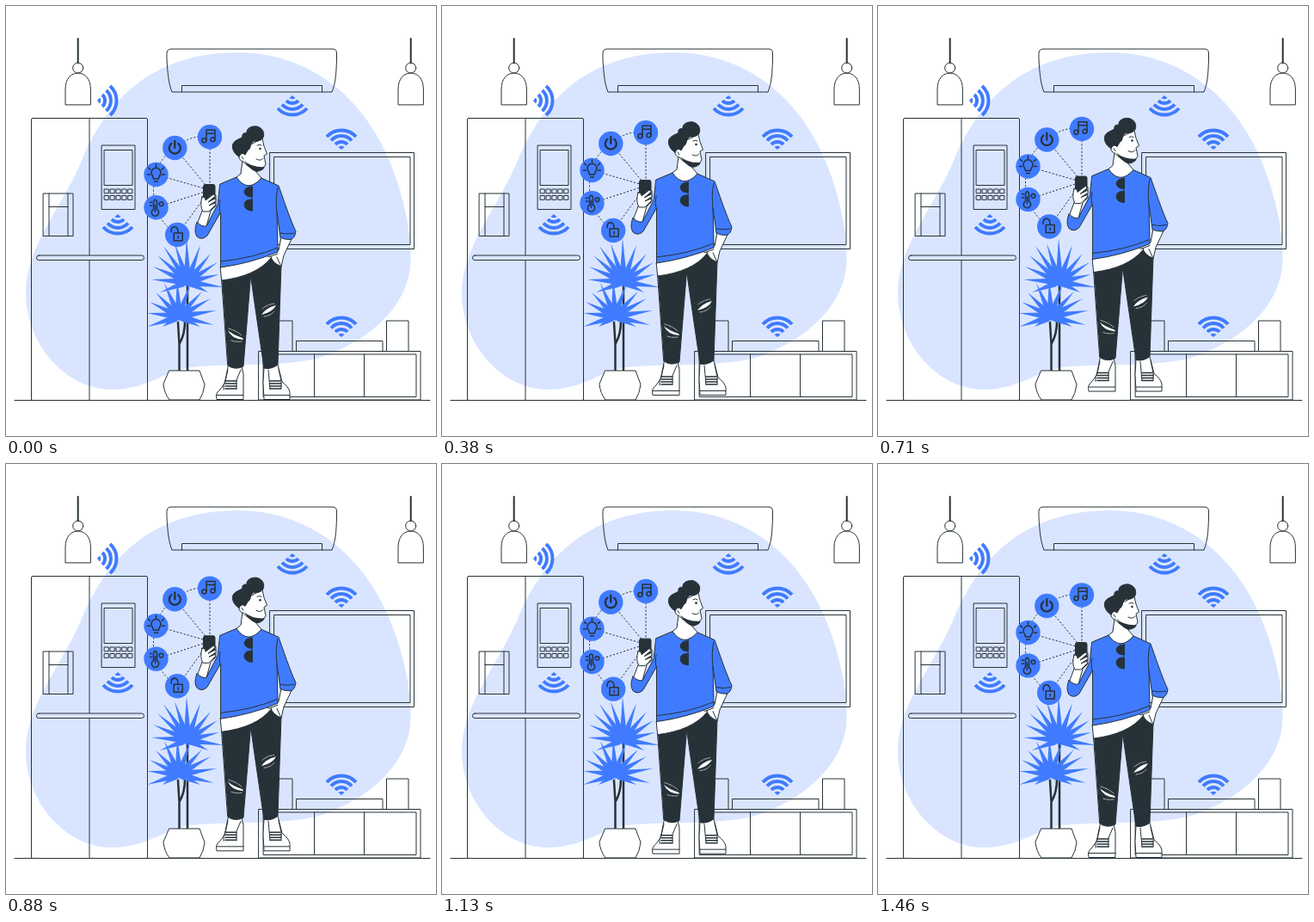
Recreate the animation shown at these times as an HTML page. Size 500 by 500 pixels, loop 1500 ms.

```html
<!DOCTYPE html>
<html lang="en">
<head>
<meta charset="utf-8">
<title>Smart home</title>
<style>
  html, body { margin: 0; width: 100%; height: 100%; overflow: hidden; background: #fff; }
  svg { display: block; width: 100%; height: 100%; }
  .line { fill: none; stroke: #263238; stroke-width: 1; stroke-linejoin: round; stroke-linecap: round; }
  .white { fill: #fff; }
  .blue { fill: #407bff; }
  .pale { fill: #d9e5ff; }
  .dark { fill: #263238; }
  .flat { stroke: none; }
  .thick { stroke-width: 2; }
  .dash { stroke-dasharray: 2.2 2; stroke-linecap: butt; }
</style>
</head>
<body>
<svg viewBox="0 0 500 500">
  <defs>
    <g id="lamp">
      <path class="thick" d="M83.7 38V66"/>
      <circle cx="83.7" cy="72" r="6"/>
      <path d="M69 114.500V97C69 84 76 78 83.700 78S98.400 84 98.400 97V114.500Z"/>
    </g>
    <g id="wifi" fill="none" stroke="#407bff" stroke-width="4" stroke-linecap="butt">
      <path d="M-17-15A23 23 0 0 1 17-15M-12-10.500A16 16 0 0 1 12-10.500M-7-6A9.500 9.500 0 0 1 7-6"/>
      <path class="blue flat" d="M0 0L-3.500-3Q0-5.500 3.500-3Z"/>
    </g>
  </defs>

  <path class="pale" d="M270 54C340 54 398 92 432 152C458 198 474 262 470 305C464 350 425 388 365 409C320 420 270 415 215 420C180 426 165 446 122 446C70 445 24 395 23 335C23 280 62 240 88 180C115 115 165 54 270 54Z"/>

  <g class="line">
    <use href="#lamp"/><use href="#lamp" x="387"/>
    <path d="M187 55Q187 50 192 50H380Q384.500 50 384.500 55V62C384 80 383 90 379 100H193C189 90 188 78 187 62ZM204.500 100V92.500H367.500V100"/>
    <rect x="29.500" y="130.500" width="135" height="328" rx="1.500"/>
    <path d="M97 130.500V458"/>
    <rect class="pale" x="35.500" y="290" width="125" height="5.500" rx="2.700"/>
    <path d="M43.500 218H78V267.500H43.500ZM50 218V267.500M72 218V267.500M50 233.500H72"/>
    <path d="M111.500 162H150V236.500H111.500ZM114.500 167.500H147V208.500H114.500Z"/>
    <g id="keys"></g>
    <path d="M307 170.500H474.500V282.500H307ZM312 175.500H470V277.500H312Z"/>
    <path d="M294 401.500H482V458H294ZM299.500 405H477V454.500H299.500ZM358.500 405V454.500M416.500 405V454.500"/>
    <path d="M307 401.500V366H333V401.500M442.500 401.500V366H468V401.500M337.500 401.500V389.500H438V401.500M10 458.500H493"/>
  </g>

  <use href="#wifi" transform="translate(390 167)"/>
  <use href="#wifi" transform="translate(390 385)"/>
  <use href="#wifi" transform="translate(333 104) rotate(180)"/>
  <use href="#wifi" transform="translate(130 242) rotate(180)"/>
  <use href="#wifi" transform="translate(106 110) rotate(90)"/>

  <g class="line">
    <path stroke-width="2.500" d="M211 324V424M201.500 424V393L200 368M202 392Q208 382 208 366"/>
    <path class="white" d="M190 424H225L231 440Q230 450 225 458H190Q184 450 183 440Z"/>
  </g>
  <g id="leaves" class="blue"></g>

  <g id="floating" class="line">
    <path class="dash" d="M237 152Q215 149 196 165Q178 178 174 196Q169 215 174 234Q181 254 199 266"/>
    <g id="icons"></g>

    <!-- shoes -->
    <path class="white" d="M259 417Q266 421 274 419Q277 427 276 437V457.500H245Q243 450 249 446L254 439Z"/>
    <path class="white" d="M300 420Q308 422 316 417L321 437Q329 443 330 449V457.500H300Q298 438 300 420Z"/>
    <path d="M245 452.500H276M300 452.500H330M258 423L255 436Q252 441 253 446M273 423L268 435V445M305 423L307 445M317 422L320 436V444"/>
    <path stroke-width="1.500" d="M255 436H268M255 439H268M255 442H268M255 445H268M307 436H319M307 439H320M307 442H320M307 445H320"/>

    <!-- trousers -->
    <path class="dark" d="M251 318Q290 314 308 292L320 301L316 417Q308 423 300 421L284.500 314L276 419Q266 424 258 418Z"/>
    <path class="white flat" d="M258 377Q263 382 275 386L276 388Q262 387 258 377ZM297 359Q302 351 314 348Q310 356 297 359Z"/>
    <path stroke="#fff" stroke-width=".7" stroke-dasharray="1.500 1.200" d="M259 375Q269 378 274 383M262 389Q268 391 274 390M298 352Q304 347 312 346M300 361Q308 360 312 355"/>

    <!-- shirt, sweater and arms -->
    <path class="white" d="M249.500 303L310 288L308 293Q291 314 251 319Z"/>
    <path class="white" d="M320 269L317 284Q308 285 303 290Q305 293 308 291Q309 298 320 303L323 290L332 271Z"/>
    <path d="M308 291L316 288M320 303L315 292"/>
    <path class="white" d="M222 254L230 233Q226 228 228 222L238 217L244 220V232L238 238L232 260Z"/>
    <path class="blue" d="M249 207L268 199Q281 209 297 200L317 209C321 220 331 250 337 262Q336 270 331 271.500Q324 272 319 269L315 240L316 286Q285 299 249.500 304V240L234 267Q228 273 222 268Q218 262 222 251Q227 257 233 256L246 231Z"/>
    <path d="M315 240Q313 224 316 211M249.500 241Q247 236 249 226M250 297Q288 293 316 281M319 264Q327 266 335 264"/>
    <path class="white" d="M275 180L273 195L268 199Q281 218 297 200L291 193V184Z"/>
    <path class="dark" d="M286 210Q278 210 277 216Q278 222 286 222ZM286 225Q278 224 277 231Q278 238 286 238Z"/>
    <path d="M286 209V238"/>

    <!-- head -->
    <path class="white" d="M281 163L298 154L300 163L303.500 172L300 174L302 184Q300 189 292 190Q281 188 276 181Q270 179 271 174Q274 168 278 172Z"/>
    <path class="dark flat" d="M277 180Q286 188 301 187L299 190Q295 193 291 193Q283 190 277 180Z"/>
    <path class="dark" d="M271 175C265 172 262 165 264 160C267 155 272 155 275 152C274 148 278 147 280 148C279 142 286 139 292 140C299 142 301 148 299 153Q296 158 288 157L285 160Q284 167 281 168L278 173Q274 169 271 175Z"/>
    <circle class="dark flat" cx="295.500" cy="166" r="1.300"/>
    <path d="M292 162Q295 160 297 162M291 178Q296 181 299 177M274 175L276 178"/>

    <!-- phone and fingers -->
    <rect class="dark" x="229.500" y="207.500" width="13.500" height="27" rx="2"/>
    <path class="white" d="M228 222Q232 222 232 226L241 219Q245 220 241 223L235 228L243 224Q246 226 242 228L236 232L243 229Q245 231 241 234L236 239H229Q225 232 228 222Z"/>
  </g>
</svg>
<script>
const byId = id => document.getElementById(id);

for (let i = 0; i < 10; i++) {
  byId('keys').innerHTML +=
    `<rect x="${114.5 + i % 5 * 6.9}" y="${i < 5 ? 213 : 220.5}" width="4.800" height="4.800"/>`;
}

// Each leaf is a thin spike from the crown to its tip.
function fan(x, y, tips) {
  return tips.map(([tipX, tipY]) => {
    const dx = tipX - x, dy = tipY - y, k = 3.6 / Math.hypot(dx, dy);
    const sx = -dy * k, sy = dx * k;
    const baseX = x + dx * .2, baseY = y + dy * .2;
    return `<path d="M${x - dx * .15} ${y - dy * .15}L${baseX + sx} ${baseY + sy}L${tipX} ${tipY}L${baseX - sx} ${baseY - sy}Z"/>`;
  }).join('');
}
byId('leaves').innerHTML =
  fan(211, 321, [[169, 318], [171, 303], [176, 290], [183, 279], [196, 276], [210, 270], [226, 278],
    [238, 288], [246, 298], [248, 312], [253, 327], [235, 333], [179, 333]]) +
  fan(201, 361, [[164, 373], [164, 357], [167, 344], [174, 333], [184, 322], [199, 318], [214, 324],
    [228, 332], [238, 340], [245, 354], [242, 371], [226, 373], [182, 373]]);

const icons = [
  [237, 152.3, '<path d="M-4 4V-8H6V3M-4-4H6"/><circle cx="-6.500" cy="4" r="2.500"/><circle cx="3.500" cy="3" r="2.500"/>'],
  [196.3, 165, '<path stroke-width="2.300" d="M0-8V0M-4-5A6.500 6.500 0 1 0 4-5"/>'],
  [174.5, 196, '<path d="M-3 5Q-3 3-5 0A5.500 5.500 0 1 1 5 0Q3 3 3 5ZM-2 8H2M0-12V-9M-9-8L-7-6M9-8L7-6M-10 0H-7M10 0H7"/>'],
  [174.5, 234.3, '<path d="M-3 2V-7Q-1-11 1-7V2A4.200 4.200 0 1 1-3 2ZM-1-3V5M-5-6H-7M-5-2H-7"/><circle cx="6" cy="-4" r="2.300"/>'],
  [199.2, 266, '<path d="M-4-2H6V7H-4ZM-7-3V-6Q-6-10-2-9Q1-8 1-2M1 1.500V4"/>']
];
byId('icons').innerHTML = icons.map(([x, y, glyph]) =>
  `<path class="dash" d="M237 214L${x} ${y}"/>
   <circle class="blue flat" cx="${x}" cy="${y}" r="14.200"/>
   <g transform="translate(${x} ${y})" stroke-width="1.500">${glyph}</g>`).join('');

const PERIOD = 1500, PHASE = 20, RISE = 10;
const start = performance.now();
function draw(now) {
  const p = (Math.max(0, now - start) + PHASE) % PERIOD / PERIOD;
  const lift = RISE * (1 - Math.abs(2 * p - 1));
  byId('floating').setAttribute('transform', `translate(0 ${.3 - lift})`);
  requestAnimationFrame(draw);
}
draw(start);
</script>
</body>
</html>
```
